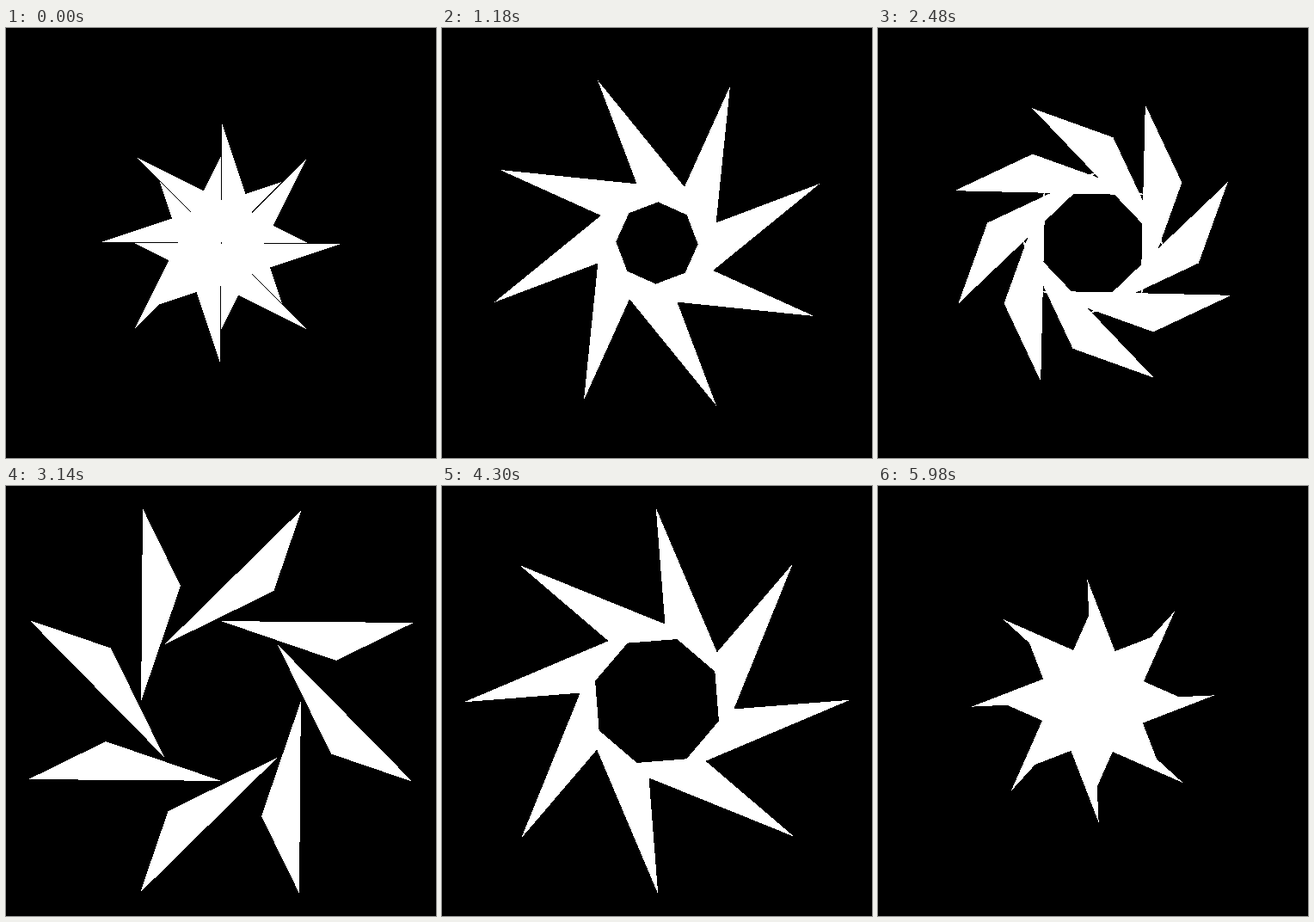
Write an HTML page that moves like this. It is 500 by 500 pixels and loops after 6000 ms.

```html
<!DOCTYPE html>
<html lang="en">
<head>
<meta charset="utf-8">
<title>Pinwheel</title>
<style>
  html, body { margin: 0; width: 100%; height: 100%; overflow: hidden; background: #000; }
  svg { display: block; width: 100vw; height: 100vh; }
</style>
</head>
<body>
<svg viewBox="-250 -250 500 500">
  <path id="blades" fill="#fff" shape-rendering="crispEdges"/>
</svg>
<script>
const LOOP = 6000, STEP = 20, COUNT = 8;
const REACH = 150;          // farthest distance of a blade's corner from the centre
const LONG = 100 * Math.SQRT2, SHORT = 100;
const blades = document.getElementById('blades');

// Angles are in degrees, clockwise from straight up.
function polar(angle, radius, [x, y] = [0, 0]) {
  const a = angle * Math.PI / 180;
  return [x + radius * Math.sin(a), y - radius * Math.cos(a)];
}
const toPath = points => 'M' + points.map(p => p.map(v => v.toFixed(3)).join(' ')).join('L') + 'Z';

function blade(direction, distance, spin) {
  const corner = polar(direction, distance);
  const heading = direction + spin;
  return toPath([corner, polar(heading, LONG, corner), polar(heading + 135, SHORT, corner)]);
}

function draw(time) {
  const p = time / LOOP;
  // The outward travel runs one step ahead of the rotation.
  const travel = (time + STEP) % LOOP / LOOP;
  const distance = REACH * (1 - Math.abs(2 * travel - 1));
  const spin = 675 * p - 135;
  let d = '';
  for (let i = 0; i < COUNT; i++) d += blade(135 * p + i * 360 / COUNT, distance, spin);
  blades.setAttribute('d', d);
}

const start = performance.now();
function tick() {
  const elapsed = (performance.now() - start) % LOOP;
  draw(Math.floor(elapsed / STEP) * STEP);
  requestAnimationFrame(tick);
}
draw(0);
requestAnimationFrame(tick);
</script>
</body>
</html>
```
